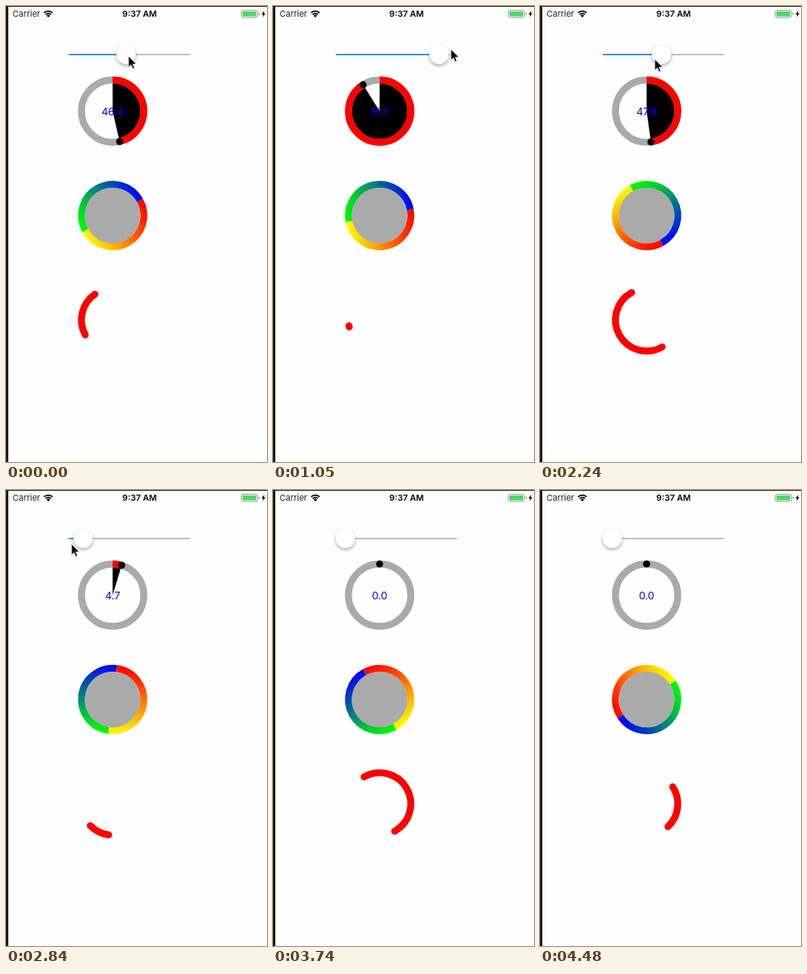
Recreate the animation shown at these times as an HTML page with a canvas. Size 339 by 592 pixels, loop 4580 ms.

```html
<!DOCTYPE html>
<html lang="en">
<head>
<meta charset="utf-8">
<title>Progress rings</title>
<style>
html, body { margin: 0; width: 100%; height: 100%; overflow: hidden; background: #fefefe; }
canvas { display: block; }
</style>
</head>
<body>
<canvas id="stage" width="339" height="592"></canvas>
<script>
const ctx = document.getElementById('stage').getContext('2d');
const LOOP = 4580, TAU = Math.PI * 2, RAD = Math.PI / 180;
const CX = 138.5, RING = 40.5, LINE = 9;
const RED = '#ff0000', GRAY = '#aaaaaa';

// [time, value] and [time, x, y]
const valueKeys = [[0, 46.4], [1050, 91.1], [1250, 100], [1820, 100], [2250, 47.8], [2850, 4.7], [3000, 0]];
const cursorKeys = [[0, 159, 65], [1050, 231, 56], [1350, 251, 58], [1650, 257, 60], [2250, 149, 69],
  [2850, 85, 70], [3300, 71, 73], [3450, 71, 74], [3600, 309, 576]];

function track(keys, t, i) {
  const k = keys.findIndex(key => key[0] > t);
  if (k < 0) return keys[keys.length - 1][i];
  const a = keys[k - 1], b = keys[k];
  return a[i] + (b[i] - a[i]) * (t - a[0]) / (b[0] - a[0]);
}

// cubic-bezier(.42, 0, 1, 1), solved by bisection
function easeIn(x) {
  let lo = 0, hi = 1;
  for (let i = 0; i < 24; i++) {
    const s = (lo + hi) / 2, r = 1 - s;
    if (1.26 * r * r * s + 3 * r * s * s + s ** 3 < x) lo = s; else hi = s;
  }
  return 3 * (1 - lo) * lo * lo + lo ** 3;
}
const easeOut = x => 1 - easeIn(1 - x);

function disc(x, y, r, color) {
  ctx.fillStyle = color;
  ctx.beginPath();
  ctx.arc(x, y, r, 0, TAU);
  ctx.fill();
}

function arc(x, y, r, from, to, width, color, cap = 'butt') {
  ctx.strokeStyle = color;
  ctx.lineWidth = width;
  ctx.lineCap = cap;
  ctx.beginPath();
  ctx.arc(x, y, r, from, to);
  ctx.stroke();
}

function polygon(points, color) {
  ctx.fillStyle = color;
  ctx.beginPath();
  points.forEach(([x, y]) => ctx.lineTo(x, y));
  ctx.closePath();
  ctx.fill();
}

function text(str, x, y, font, color, align = 'center') {
  ctx.font = font + ' Inter, Roboto, sans-serif';
  ctx.textAlign = align;
  ctx.fillStyle = color;
  ctx.fillText(str, x, y);
}

function drawScreen() {
  ctx.fillStyle = '#fefefe';
  ctx.fillRect(0, 0, 339, 592);
  ctx.fillStyle = '#1a1a1c';
  ctx.fillRect(0, 0, 3, 592);
  ctx.fillRect(0, 0, 339, 1);

  text('Carrier', 8.5, 14, '11px', '#222', 'left');
  text('9:37 AM', 173.5, 14, '600 11px', '#000');
  for (const r of [7.8, 4.8]) arc(55, 14.4, r, -135 * RAD, -45 * RAD, 1.9, '#000');
  polygon([[55, 15], [52.7, 12.2], [55, 11.3], [57.3, 12.2]], '#000');

  ctx.strokeStyle = '#999';
  ctx.lineWidth = 1;
  ctx.beginPath();
  ctx.roundRect(305.5, 5.5, 21, 9.5, 2.5);
  ctx.stroke();
  ctx.fillStyle = '#4cd964';
  ctx.beginPath();
  ctx.roundRect(307, 7, 18, 6.5, 1);
  ctx.fill();
  ctx.fillStyle = '#999';
  ctx.fillRect(328, 8.5, 1.2, 3.5);
  polygon([[335.5, 6], [331.8, 10.8], [334, 10.8], [333.2, 14.5], [337, 9.5], [334.8, 9.5]], '#000');
}

function drawSlider(value) {
  const x = 94 + 1.335 * value;
  ctx.fillStyle = '#b5b5b5';
  ctx.fillRect(x, 62.2, 239 - x, 1.7);
  ctx.fillStyle = '#1680ee';
  ctx.fillRect(81.5, 62.2, x - 81.5, 1.7);
  ctx.save();
  ctx.shadowColor = 'rgba(0,0,0,.32)';
  ctx.shadowBlur = 4;
  ctx.shadowOffsetY = 2.4;
  disc(x, 62.8, 12.6, '#fff');
  ctx.restore();
}

function drawDial(value) {
  const y = 136.5, top = -Math.PI / 2, end = top + value / 100 * TAU;
  ctx.fillStyle = '#000';
  ctx.beginPath();
  ctx.moveTo(CX, y);
  ctx.arc(CX, y, RING, top, end);
  ctx.fill();
  arc(CX, y, RING, 0, TAU, LINE, GRAY);
  if (value > 0) arc(CX, y, RING, top, end, LINE, RED);
  disc(CX + RING * Math.cos(end), y + RING * Math.sin(end), 4.6, '#000');
  text(value.toFixed(1), CX, 141.5, '13.5px', '#0000ff');
}

function drawWheel(angle) {
  const half = (from, a, b) => {
    const fill = ctx.createLinearGradient(45, 0, -45, 0);
    fill.addColorStop(0, a);
    fill.addColorStop(1, b);
    arc(0, 0, RING, from, from + Math.PI, LINE, fill);
  };
  ctx.save();
  ctx.translate(CX, 272);
  ctx.rotate(angle);
  half(0, '#ff0000', '#ffff00');
  half(Math.PI, '#0000ff', '#00ff00');
  ctx.restore();
  disc(CX, 272, 36.2, GRAY);
}

function drawSpinner(angle, phase) {
  const end = easeIn(Math.min(1, phase / 1000));
  const start = phase > 1000 ? easeOut((phase - 1000) / 500) : 0;
  arc(CX, 407.5, RING, angle + start * TAU, angle + end * TAU + 0.001, LINE, RED, 'round');
}

function drawCursor(x, y) {
  const shape = [[0, 0], [0, 14.5], [3.3, 11.4], [5.6, 16.6], [8, 15.6], [5.8, 10.5], [10.3, 10.5]];
  ctx.save();
  ctx.translate(x, y);
  ctx.shadowColor = 'rgba(0,0,0,.3)';
  ctx.shadowBlur = 2;
  ctx.shadowOffsetY = 1;
  polygon(shape, '#000');
  ctx.shadowColor = 'transparent';
  ctx.strokeStyle = '#fff';
  ctx.lineWidth = 1;
  ctx.stroke();
  ctx.restore();
}

// The picture advances in steps of about 150 ms, two of them a little short.
function stepTime(ms) {
  const shifted = ms + (ms >= 2240 ? 10 : 0) + (ms >= 4480 ? 10 : 0);
  return Math.min(4488, Math.floor(shifted / 150) * 150);
}

function draw(ms) {
  const t = stepTime(ms), value = track(valueKeys, t, 1);
  const elapsed = t + 420, spin = elapsed / 1000 * TAU;
  drawScreen();
  drawSlider(value);
  drawDial(value);
  drawWheel(spin + Math.PI);
  drawSpinner(spin, elapsed % 1500);
  if (t < 3750) drawCursor(track(cursorKeys, t, 1), track(cursorKeys, t, 2));
}

const began = performance.now();
function tick() {
  draw((performance.now() - began) % LOOP);
  requestAnimationFrame(tick);
}
tick();
</script>
</body>
</html>
```
